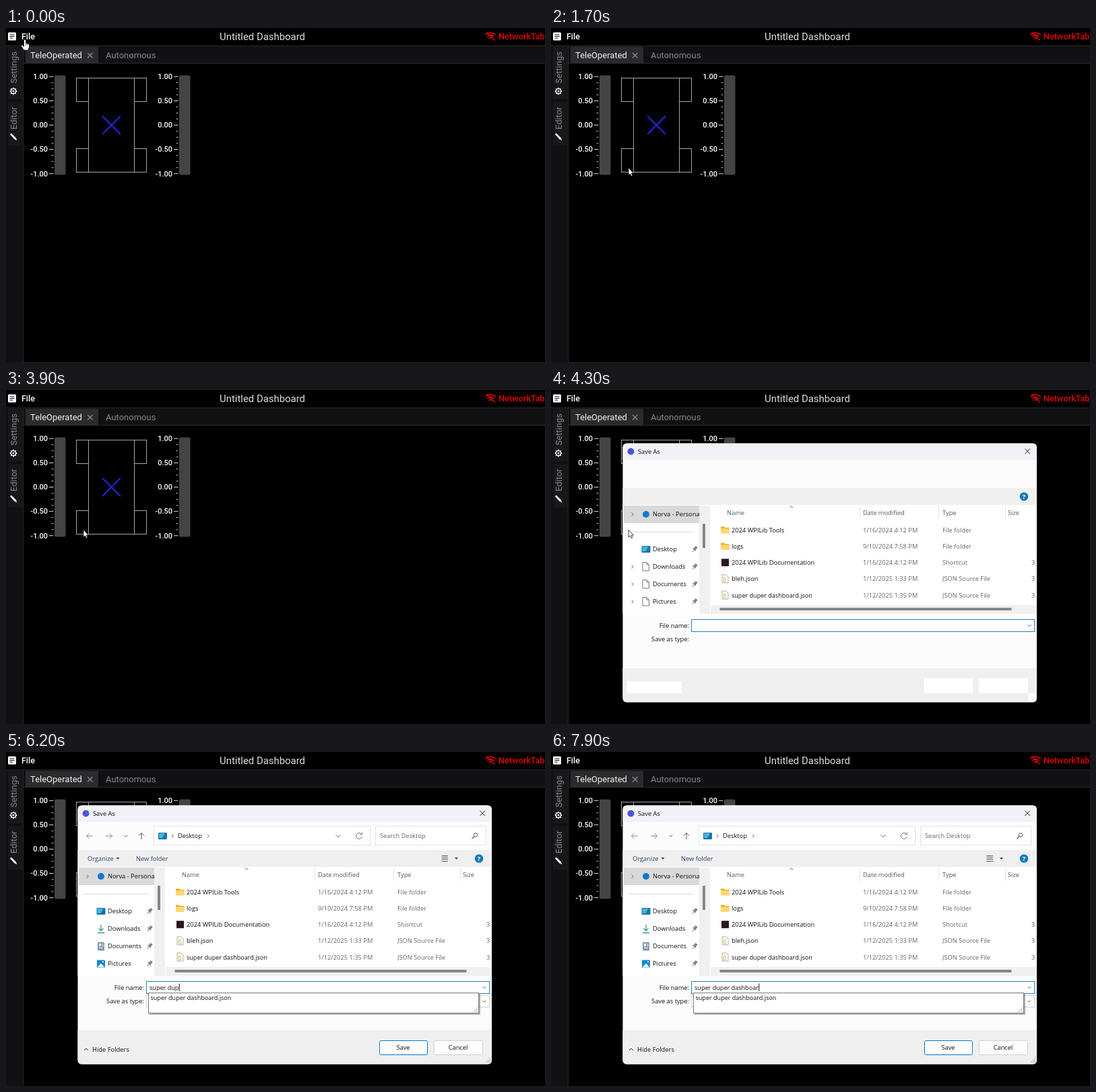
An HTML page for the animation above (8000 ms loop, 800 by 497 pixels).

```html
<!DOCTYPE html>
<html lang="en">
<head>
<meta charset="utf-8">
<title>Saving a dashboard</title>
<style>
html, body { margin: 0; width: 100%; height: 100%; overflow: hidden; background: #000; }
svg { display: block; width: 100vw; height: 100vh; }
text { font-family: Roboto, sans-serif; white-space: pre; }
#dialog text { font-family: "Open Sans", "Noto Sans", sans-serif; }
</style>
</head>
<body>
<svg id="stage" viewBox="0 0 800 497"></svg>
<script>
const LOOP = 8000, TYPED = 'super duper dashboard';

const rect = (x, y, w, h, fill, more = '') =>
  `<rect x="${x}" y="${y}" width="${w}" height="${h}" fill="${fill}" ${more}/>`;
const frame = (x, y, w, h, stroke, fill = 'none', more = '') =>
  rect(x + .5, y + .5, w - 1, h - 1, fill, `stroke="${stroke}" ${more}`);
const line = (d, stroke, width = 1, more = '') =>
  `<path d="${d}" fill="none" stroke="${stroke}" stroke-width="${width}" ${more}/>`;
const shape = (d, fill, more = '') => `<path d="${d}" fill="${fill}" ${more}/>`;
const disc = (x, y, r, fill, more = '') => `<circle cx="${x}" cy="${y}" r="${r}" fill="${fill}" ${more}/>`;
const text = (x, y, s, size, fill, more = '') =>
  `<text x="${x}" y="${y}" font-size="${size}" fill="${fill}" ${more}>${s}</text>`;
const group = (id, body, more = '') => `<g id="${id}" ${more}>${body}</g>`;
const list = (items, fn) => items.map(fn).join('');

// Dashboard window
function gauge(x) {
  let out = rect(x, 70.5, 16.5, 148, '#444', 'rx="2"');
  for (let i = 0; i <= 16; i++) {
    const y = 72.3 + i * 9.03, major = i % 4 == 0;
    out += line(`M${x - (major ? 8 : 4.5)} ${y}H${x - 1.5}`, major ? '#ddd' : '#bbb');
    if (major) out += text(x - 10, y + 3.8, (1 - i / 8).toFixed(2), 11, '#fff', 'text-anchor="end" font-weight="500"');
  }
  return out;
}

function sideTab(y, h, label, labelY) {
  return rect(3, y, 21, h, '#18181a') +
    text(0, 0, label, 13, '#858585', `transform="translate(16 ${labelY}) rotate(-90)"`);
}

function dashboard() {
  const gear = disc(11, 94, 3.6, 'none', 'stroke="#fff" stroke-width="1.3"') + disc(11, 94, 1.5, '#fff') +
    list([0, 45, 90, 135, 180, 225, 270, 315], a =>
      line('M11 90.3V88.8', '#fff', 2, `transform="rotate(${a} 11 94)"`));
  const pencil = shape('M6 158.2L7.8 156.6L14.8 163.5L16.2 167.3L12.8 165.8Z', '#fff');
  const fileIcon = rect(3, 6.5, 12, 12, '#fff', 'rx="1.5"') +
    line('M5.5 10H12.5M5.5 12.5H12.5M5.5 15H10', '#111', 1.2);
  const offline = line('M711.5 10Q719 4 727 10M714 12.8Q719 8.8 724.5 12.8M716.5 15.5Q719 13.5 721.8 15.5', '#e00008', 1.7) +
    line('M713 6L726 18.5', '#e00008', 1.3);
  const wheels = list([[104, 74], [190, 74], [104, 179], [190, 179]], ([x, y]) => frame(x, y, 19, 36, '#a5a5a5'));
  return rect(0, 0, 800, 497, '#000') +
    rect(0, 27, 26, 470, '#111013') + rect(26, 27, 774, 25, '#111013') +
    rect(0, 26, 800, 1, '#28282a') + rect(26, 52, 774, 1, '#2c2c2e') + rect(25, 27, 1, 470, '#29292b') +
    rect(29, 28, 108, 24, '#2b2b2d') +
    fileIcon + text(23, 17, 'File', 12.5, '#fff', 'font-weight="500"') +
    text(380.5, 17.5, 'Untitled Dashboard', 14.9, '#dedede', 'text-anchor="middle"') +
    offline + text(731, 17, 'NetworkTables', 12.7, '#e00008', 'font-weight="500"') +
    text(36, 45, 'TeleOperated', 13, '#f0f0f0') + line('M121 37L128.5 44.5M128.5 37L121 44.5', '#888', 1.4) +
    text(148, 45, 'Autonomous', 13, '#858585') +
    sideTab(28, 78, 'Settings', 82.5) + gear + sideTab(110, 65, 'Editor', 151) + pencil +
    gauge(72) + gauge(257) + frame(122, 74, 69, 141, '#a5a5a5') + wheels +
    line('M143 131L170 158M170 131L143 158', '#2525ee', 1.8);
}

// File menu
function menu() {
  const items = [['New Dashboard', 47], ['New Window', 73], ['Open Dashboard...', 113], ['Open Example...', 139],
    ['Save Dashboard', 179], ['Save Dashboard As...', 204.5], ['Plugins', 244], ['Close Window', 284], ['Quit', 310]];
  return rect(8, 28, 136, 302, '#2b2b2d', 'rx="3"') +
    `<rect id="hover" x="8" width="136" height="26" fill="#3e3e40"/>` +
    list([93, 158, 224, 264], y => rect(8, y, 136, 1, '#434345')) +
    list(items, ([s, y]) => text(21, y + 4.2, s, 11.5, '#fff', 'font-weight="500"')) +
    line('M129 135L133 139L129 143', '#fff', 1.6);
}

// Save dialog
const SIZE = 9.3, INK = '#111', DIM = '#666';
const label = (x, y, s, fill = INK, size = SIZE, more = '') => text(x, y + 3.4, s, size, fill, more);
const chevron = (x, y, turn = 0, stroke = '#666', s = 2.5) =>
  line(`M${x - s / 2} ${y - s}L${x + s / 2} ${y}L${x - s / 2} ${y + s}`, stroke, 1, `transform="rotate(${turn} ${x} ${y})"`);
const page = (x, y) => shape(`M${x} ${y}h6l3.5 3.5v9h-9.5z`, '#fff', 'stroke="#777"') + line(`M${x + 6} ${y}v3.5h3.5`, '#777');
const monitor = (x, y) => rect(x, y, 13, 10, '#1a76a8', 'rx="1"') + shape(`M${x + 1} ${y + 1}h9l-4 7h-5z`, '#45b4dc');
const pin = y => group('', shape('M-2 -5H2V-1L3.5 1H-3.5L-2 -1Z', '#7b858c') + line('M0 1V5', '#7b858c'),
  `transform="translate(213 ${y}) rotate(40)"`);
const grip = (x, y) => list([[0, 0], [-2.5, 0], [-5, 0], [0, -2.5], [-2.5, -2.5], [0, -5]], ([a, b]) => rect(x + a, y + b, 1.3, 1.3, '#999'));

function fileList() {
  const rows = [['2024 WPILib Tools', '1/16/2024 4:12 PM', 'File folder'], ['logs', '9/10/2024 7:58 PM', 'File folder'],
    ['2024 WPILib Documentation', '1/16/2024 4:12 PM', 'Shortcut'], ['bleh.json', '1/12/2025 1:33 PM', 'JSON Source File'],
    ['super duper dashboard.json', '1/12/2025 1:35 PM', 'JSON Source File']];
  const heads = [[261, 'Name'], [463, 'Date modified'], [581, 'Type'], [678, 'Size']];
  const icon = (i, y) => i < 2
    ? shape(`M252 ${y - 5}h5l1.5 1.5h6v8.5h-12.5z`, '#e8b33b') + rect(252, y - 2, 12.5, 7, '#ffd670', 'rx="1"')
    : i == 2 ? rect(253, y - 5.5, 11, 11, '#28191d')
    : shape(`M254 ${y - 6}h6l3 3v9h-9z`, '#fffdf4', 'stroke="#b9ae90"') + text(255.2, y + 3, '{}', 6.5, '#a88420');
  return list(heads, ([x, s]) => label(x, 182.5, s, '#4b5a6a')) +
    list([458, 575, 674], x => rect(x, 172, 1, 20, '#e5e5e5')) + chevron(357, 174, -90) +
    list(rows, ([name, date, type], i) => {
      const y = 208.3 + i * 24.2;
      return icon(i, y) + label(268, y, name, INK, i == 4 ? 9.05 : SIZE) + label(463, y, date, DIM) +
        label(581, y, type, DIM) + (i > 1 ? label(713, y, '3', DIM) : '');
    }) +
    rect(237, 320, 484, 13, '#f0f0f0') + rect(250.5, 324, 433, 4, '#868686');
}

function sidebar() {
  const places = ['Desktop', 'Downloads', 'Documents', 'Pictures'];
  return rect(108, 172, 112, 26, '#d9d9d9') + chevron(121, 185) + disc(141, 185, 5, '#1478cf') +
    `<svg x="107" y="172" width="113" height="26" viewBox="107 172 113 26">${label(151, 185, 'Norva - Personal')}</svg>` +
    rect(115, 211, 98, 1, '#dcdcdc') + rect(220, 172, 16, 161, '#f0f0f0') + rect(225, 199, 4, 36, '#868686') +
    list(places, (s, i) => label(151, 237 + i * 26, s) + pin(237 + i * 26)) + monitor(134.5, 232);
}

function dialog() {
  const plainIcons = list([263, 289, 315], y => page(136, y - 6.5) + chevron(121, y));
  const icons = line('M141 257V266M137.5 262.5L141 266L144.5 262.5', '#3a9c86', 1.3) + line('M136 269H146', '#3a9c86', 1.5) +
    rect(136, 283, 10, 12.5, '#8197ad', 'rx="1"') + rect(138, 285, 3, 4, '#fff') + line('M142.5 286H145M142.5 288.5H145M138 291.5H144', '#fff') +
    rect(135, 309.5, 12, 11.5, '#1787cf', 'rx="1"') + shape('M135.5 320.5L141 314.5L146.5 320.5Z', '#fff') + disc(144, 312.3, 1, '#fff');
  const arrows = line('M129 125H119.5M123.5 121L119.5 125L123.5 129M148 125H157.5M153.5 121L157.5 125L153.5 129', '#8a8a8a') +
    chevron(178, 125, 90) + line('M201 130V120.5M197 124.5L201 120.5L205 124.5', '#555');
  const address = frame(219, 110, 322, 29, '#e3e3e3', '#fff') + monitor(226, 120) + chevron(247, 125) +
    label(255, 125, 'Desktop') + chevron(300, 125) + chevron(493, 125, 90, '#666', 3.5) +
    line('M527.5 122A4.5 4.5 0 1 0 528.4 126M528.4 119.5V122.8H525', '#777') +
    frame(548, 110, 165, 29, '#e3e3e3', '#fff') + label(555, 125, 'Search Desktop', DIM) +
    disc(697, 123.5, 2.8, 'none', 'stroke="#555"') + line('M695 125.7L691.5 129', '#555', 1.2);
  const toolbar = label(121, 158.5, 'Organize', '#234668') + shape('M163.5 157H168.5L166 160Z', '#234668') +
    label(193, 158.5, 'New folder', '#234668') + line('M646.5 154.5H656M646.5 157H656M646.5 159.5H656M646.5 162.5H656', '#555') +
    shape('M666 157H671L668.5 160Z', '#444');
  const buttons = chevron(119, 442.5, -90, '#333', 3) + label(128, 442.5, 'Hide Folders', INK, 9.4) +
    frame(554, 429, 72, 22, '#0b78c4', '#fdfdfd', 'rx="2"') + label(589.5, 440, 'Save', INK, SIZE, 'text-anchor="middle"') +
    frame(635, 429, 73, 22, '#d2d2d2', '#fdfdfd', 'rx="2"') + label(671, 440, 'Cancel', INK, SIZE, 'text-anchor="middle"') +
    grip(717.5, 460.5);
  const blanks = rect(113, 433.5, 81, 17.5, '#fff') + rect(554, 429, 72, 22, '#fff') + rect(635, 429, 73, 22, '#fff') +
    rect(708, 451, 12, 12, '#fbfbfb');
  const popup = rect(213, 360, 491, 31, '#000', 'opacity=".3"') + frame(211, 358, 491, 31, '#777', '#fff') +
    label(214.5, 365.8, 'super duper dashboard.json', INK, 9.05) + grip(698, 385.5);
  return rect(106.5, 79.5, 614.5, 385, '#fcfcfc', 'rx="6"') +
    shape('M106.5 104V85.5Q106.5 79.5 112.5 79.5H715Q721 79.5 721 85.5V104Z', '#f1f2f7') +
    disc(118.5, 91.5, 5, '#4a54dc') + label(129, 91.5, 'Save As') +
    line('M703.5 87.5L711 95M711 87.5L703.5 95', '#222') +
    rect(106.5, 146, 614.5, 25, '#efeff0') + rect(106.5, 171, 614.5, 162, '#fff') +
    shape('M106.5 414H721V458.5Q721 464.5 715 464.5H112.5Q106.5 464.5 106.5 458.5Z', '#efeff0') +
    disc(702, 158.5, 6.3, '#137ab8') + label(702, 158.5, '?', '#fff', 9.5, 'text-anchor="middle" font-weight="700"') +
    sidebar() + fileList() +
    label(205, 350.5, 'File name:', INK, SIZE, 'text-anchor="end"') + label(205, 371, 'Save as type:', INK, SIZE, 'text-anchor="end"') +
    group('early', plainIcons + blanks) +
    group('late', icons + arrows + address + toolbar + buttons + frame(208, 362, 510, 18, '#d2d2d2', '#fdfdfd') + chevron(710, 371, 90)) +
    frame(208, 341, 510, 19, '#2283b5', '#fff') + chevron(710, 350.5, 90) +
    group('typing', popup + text(213, 353.6, '', 9.1, INK, 'id="entry"') + `<rect id="caret" y="344.5" width="1" height="11.5" fill="#111"/>`);
}

const hand = shape('M-1.5 1Q0 -1 1.5 1V6L3 5.5L4.2 6.5L5.4 6.5L6.5 8V11.5L5 16H-1.5L-5.5 9.5Q-5 7.5 -3.2 9L-1.5 10.5Z', '#fff', 'stroke="#111" stroke-width=".8"') +
  line('M1.5 9V6M3.6 9V6.5', '#111', .6);
const arrow = shape('M0 0V11L2.5 8.8L4.2 12.5L6 11.7L4.3 8.1H7.4Z', '#fff', 'stroke="#111" stroke-width=".8"');

document.getElementById('stage').innerHTML = dashboard() + group('menu', menu()) + group('dialog', dialog()) +
  group('pointer', group('hand', hand) + group('arrow', arrow));

const el = id => document.getElementById(id);
const show = (id, on) => el(id).setAttribute('display', on ? 'inline' : 'none');
const path = [[0, 28, 17], [300, 28, 17], [900, 118, 191], [1200, 115, 208], [LOOP, 115, 208]];

function pointerAt(t) {
  const i = path.findIndex(p => p[0] > t);
  const [t0, x0, y0] = path[i - 1], [t1, x1, y1] = path[i];
  const u = (t - t0) / (t1 - t0), e = u * u * (3 - 2 * u);
  return [x0 + (x1 - x0) * e, y0 + (y1 - y0) * e];
}

function draw(now) {
  const t = Math.floor(now % LOOP / 100) * 100;
  const [x, y] = pointerAt(t);
  const count = Math.max(0, Math.floor((t - 4800) / 155));
  const menuOpen = t >= 300 && t < 1700;

  show('menu', menuOpen);
  const rows = [34, 60, 100, 126, 166, 192];
  const row = rows.find(r => y - 1 >= r && y - 1 < r + 26);
  show('hover', row !== undefined);
  el('hover').setAttribute('y', row ?? 0);

  show('dialog', t >= 4200);
  show('early', t < 4500);
  show('late', t >= 4500);
  show('typing', count > 0);
  el('entry').textContent = TYPED.slice(0, count);
  if (count) el('caret').setAttribute('x', 213.3 + el('entry').getComputedTextLength());

  show('pointer', count == 0);
  show('hand', t < 1700);
  show('arrow', t >= 1700);
  el('pointer').setAttribute('transform', `translate(${x} ${y})`);
}

const start = performance.now();
function tick() {
  draw(performance.now() - start);
  requestAnimationFrame(tick);
}
tick();
</script>
</body>
</html>
```
